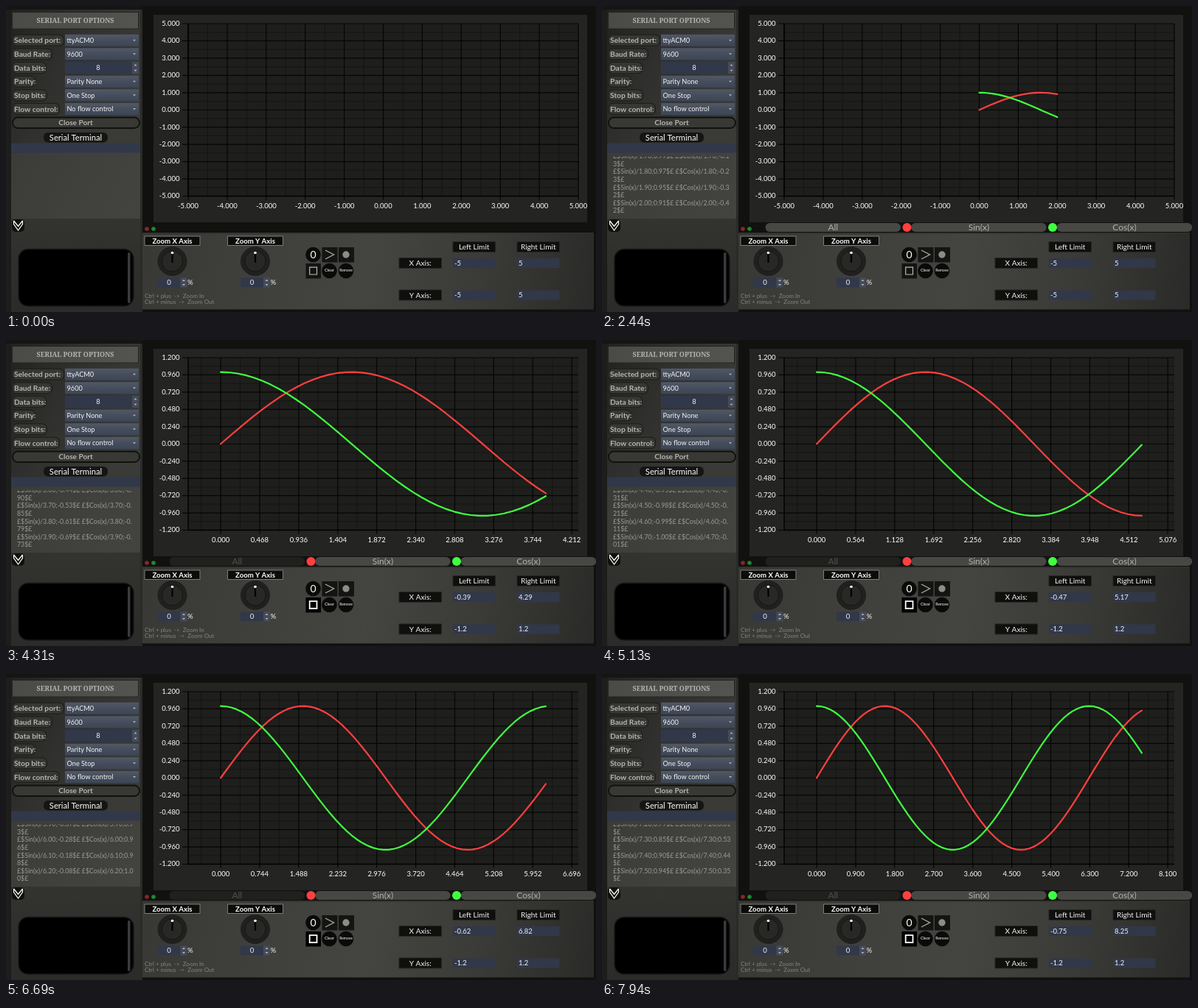
Recreate the animation shown at these times as an HTML page with a canvas. Size 800 by 416 pixels, loop 8 s.

```html
<!DOCTYPE html>
<html lang="en">
<head>
<meta charset="utf-8">
<title>Serial plotter</title>
<style>
html, body { margin: 0; width: 100%; height: 100%; overflow: hidden; background: #11110f; }
canvas { display: block; width: 800px; height: 416px; }
</style>
</head>
<body>
<canvas id="stage"></canvas>
<script>
const W = 800, H = 416, LOOP = 8000;
const START = 400, SAMPLE = 100, DIM_ALL = 3500, AUTO_FIT = 4060;
const PLOT = { x: 247, y: 24, w: 529, h: 234.5 };
const RED = '#ff4040', GREEN = '#40ff40', FIELD = '#31384a';
const canvas = document.getElementById('stage');
const ctx = canvas.getContext('2d');
const dpr = window.devicePixelRatio || 1;
canvas.width = W * dpr;
canvas.height = H * dpr;

function text(s, x, y, size, color = '#f4f4f4', align = 'left', weight = 400, family = 'Lato, sans-serif') {
  ctx.font = `${weight} ${size}px ${family}`;
  ctx.fillStyle = color;
  ctx.textAlign = align;
  ctx.textBaseline = 'alphabetic';
  ctx.fillText(s, x, y + size * 0.35);
}

function box(x, y, w, h, fill, r = 0, stroke, lw = 1) {
  ctx.beginPath();
  ctx.roundRect(x, y, w, h, r);
  if (fill) { ctx.fillStyle = fill; ctx.fill(); }
  if (stroke) { ctx.strokeStyle = stroke; ctx.lineWidth = lw; ctx.stroke(); }
}

function disc(x, y, r, fill, stroke, lw = 1) {
  box(x - r, y - r, 2 * r, 2 * r, fill, r, stroke, lw);
}

function path(points, color, lw) {
  ctx.beginPath();
  points.forEach(([x, y]) => ctx.lineTo(x, y));
  ctx.strokeStyle = color;
  ctx.lineWidth = lw;
  ctx.stroke();
}

function arrow(x, y, dir, color = '#b4b8c0') {
  ctx.beginPath();
  ctx.moveTo(x - 2, y - dir);
  ctx.lineTo(x + 2, y - dir);
  ctx.lineTo(x, y + dir * 1.2);
  ctx.fillStyle = color;
  ctx.fill();
}

function gradient(x0, y0, x1, y1, ...colors) {
  const g = ctx.createLinearGradient(x0, y0, x1, y1);
  colors.forEach((c, i) => g.addColorStop(i / (colors.length - 1), c));
  return g;
}

function spinArrows(x, y, h) {
  box(x, y, 9, h, '#454b58');
  arrow(x + 4.5, y + h * 0.27, -1);
  arrow(x + 4.5, y + h * 0.73, 1);
}

function portPanel() {
  box(0, 0, 185, H, gradient(0, 0, 185, 90, '#20201e', '#30302e', '#3a3a37'));
  box(0, 289, 185, 127, gradient(0, 289, 0, 416, '#333330', '#2b2b29'));
  box(0, 0, 7, H, '#1d1d1b');
  box(182, 0, 3, H, '#2a2a28');
  box(0, 0, 185, 5, '#151513');
  box(8.5, 8.5, 171, 22.5, gradient(8, 0, 180, 0, '#4a4a47', '#535350'), 0, '#242422');
  text('SERIAL PORT OPTIONS', 94, 19.7, 9, '#b4b4b0', 'center', 700, '"Noto Serif", serif');

  const rows = [
    ['Selected port:', 'ttyACM0', 70], ['Baud Rate:', '9600', 54], ['Data bits:', '8', 46],
    ['Parity:', 'Parity None', 31], ['Stop bits:', 'One Stop', 47], ['Flow control:', 'No flow control', 64]
  ];
  rows.forEach(([label, value, w], i) => {
    const y = 46.7 + i * 18.65;
    box(8.5, y - 7.5, w, 15, '#363633', 6, '#1e1e1c', 1.2);
    text(label, 11, y, 10.2, '#b4b4b0', 'left', 700);
    if (i === 2) {
      box(80, y - 8, 100, 16, FIELD);
      text(value, 125, y, 9.4, '#f4f4f4', 'center');
      spinArrows(171, y - 8, 16);
    } else {
      box(80, y - 8, 100, 16, gradient(0, y - 8, 0, y + 8, '#515866', '#454d5c', '#3d4657'));
      text(value, 82.5, y, 9.2);
      arrow(174, y, 1);
    }
  });
  box(9, 151.5, 172, 14.5, '#383835', 7, '#10100e', 1.8);
  text('Close Port', 94.5, 158.5, 10.1, '#b4b4b0', 'center', 700);
  box(51, 172, 87, 13.5, '#151513', 6);
  text('Serial Terminal', 94.5, 178.7, 11.2, '#ffffff', 'center');
  box(7, 186.5, 175, 13, FIELD);
  box(7, 199.5, 175, 89.5, gradient(7, 200, 182, 289, '#3b3b38', '#40403d', '#434340'));

  box(8, 290, 17, 17, '#10100e', 5);
  path([[10.5, 292], [16.5, 299.5], [22.5, 292]], '#ffffff', 1.3);
  path([[10.5, 292], [10.5, 296.5], [16.5, 305], [22.5, 296.5], [22.5, 292]], '#ffffff', 1.2);

  box(17, 330.5, 156, 77.5, '#000000', 13, '#191917', 1.5);
  box(165, 335, 3.5, 69, '#3a3a3e', 1.7);
}

function knob(x, label) {
  box(x - 37.5, 313, 75, 12.5, '#0c0c0b', 0, '#7c7c79');
  text(label, x, 319.2, 9.6, '#ffffff', 'center', 700);
  disc(x, 347, 19.5, '#20201e', '#1a1a18');
  ctx.setLineDash([1, 2]);
  disc(x, 347, 19.5, null, '#30302d', 1);
  ctx.setLineDash([]);
  disc(x, 347, 14, '#282826', '#161614');
  path([[x, 336], [x, 349]], '#000000', 2.2);
  disc(x, 335.5, 1.8, '#ffffff');
  box(x - 20, 369.5, 31, 13, FIELD);
  text('0', x - 4.5, 376, 9.6, '#f4f4f4', 'center');
  spinArrows(x + 11, 369.5, 13);
  text('%', x + 20.5, 376, 9.6);
}

function controls(auto) {
  box(185, 308.5, 612, 104, gradient(185, 308, 797, 412, '#383835', '#3f3f3c', '#444441', '#3a3a37', '#2a2a28'));
  box(185, 308, 612, 1.5, '#30302d');
  knob(225.5, 'Zoom X Axis');
  knob(338, 'Zoom Y Axis');
  text('Ctrl + plus  ->  Zoom In', 188, 394, 8, '#84847f');
  text('Ctrl + minus  ->  Zoom Out', 188, 401.7, 8, '#84847f');

  disc(416.5, 338, 10.3, '#0a0a09');
  text('0', 416.5, 337.7, 14, '#ffffff', 'center');
  box(428.5, 328, 21, 20.5, '#141412');
  path([[433, 332], [444.5, 338], [433, 344]], '#a8a8a3', 1.4);
  box(451, 328, 21, 20.5, '#141412');
  disc(461, 338, 4.7, '#8c8c88');
  box(406.5, 350, 20.5, 20.5, auto ? '#000000' : '#141412');
  box(411.7, 355.2, 9.8, 9.8, null, 0, auto ? '#ffffff' : '#b8b8b3', auto ? 1.8 : 1.2);
  disc(438.5, 360, 10.3, '#0a0a09');
  text('Clear', 438.5, 359.5, 5.7, '#ffffff', 'center');
  disc(461, 360, 10.3, '#0a0a09');
  text('Remove', 461, 359.5, 5, '#ffffff', 'center');
}

function caption(s, x, y) {
  box(x, y - 7, 57.5, 14, '#0f0f0e', 0, '#252523');
  text(s, x + 28.7, y, 10.1, '#f4f4f4', 'center');
}

function limits(view) {
  caption('Left Limit', 606, 327.5);
  caption('Right Limit', 693, 327.5);
  caption('X Axis:', 533, 349.5);
  caption('Y Axis:', 533, 393);
  [[view.x0, 606, 349.5], [view.x1, 693, 349.5], [view.y0, 606, 393], [view.y1, 693, 393]].forEach(([v, x, y]) => {
    box(x, y - 6.5, 57.5, 13, FIELD);
    text(String(+v.toFixed(2)), x + 2, y, 9.5);
  });
}

function chart(view, count) {
  const { x, y, w, h } = PLOT;
  const px = v => x + (v - view.x0) / (view.x1 - view.x0) * w;
  const py = v => y + (view.y1 - v) / (view.y1 - view.y0) * h;
  const stepX = (view.x1 - view.x0) / 10, stepY = (view.y1 - view.y0) / 10;

  box(200, 12, 588, 282, '#242422');
  box(x, y, w, h, '#1e1e1c');
  for (let i = -11; i <= 21; i++) {
    const gx = px(i * stepX / 2), gy = py(i * stepY / 2);
    if (i % 2 && gx > x && gx < x + w) path([[gx, y], [gx, y + h]], '#151513', 1);
    if (i % 2 && gy > y && gy < y + h) path([[x, gy], [x + w, gy]], '#151513', 1);
  }
  for (let i = -5; i <= 10; i++) {
    const gx = px(i * stepX), gy = py(i * stepY);
    if (gx > x - 1 && gx < x + w + 1) {
      path([[gx, y], [gx, y + h + 5]], '#050505', 1.2);
      text((i * stepX).toFixed(3), gx, 271.5, 9.5, '#ffffff', 'center');
    }
    if (i <= 5) {
      path([[x - 8, gy], [x + w, gy]], '#050505', 1.2);
      text((i * stepY).toFixed(3), 235.5, gy - 0.5, 9.5, '#ffffff', 'right');
    }
  }
  path([[x, y], [x, y + h], [x + w, y + h]], '#000000', 1.4);

  ctx.lineJoin = ctx.lineCap = 'round';
  for (const [fn, color] of [[Math.sin, RED], [Math.cos, GREEN]]) {
    const points = [];
    for (let i = 0; i <= count; i++) points.push([px(i / 10), py(fn(i / 10))]);
    if (count > 0) path(points, color, 2.2);
  }
  ctx.lineJoin = 'miter';
  ctx.lineCap = 'butt';
}

function tabs(count, dim) {
  disc(191, 303, 2.8, '#8c2525');
  disc(200, 303, 2.8, '#1f8a2c');
  if (count < 0) return;
  ['All', 'Sin(x)', 'Cos(x)'].forEach((name, i) => {
    const off = dim && i === 0, x = 221.5 + i * 197.6;
    box(x, 295, 183.5, 12, off ? '#20201e' : '#474744', 6);
    text(name, x + 91.8, 301, 12, off ? '#50504d' : '#b0b0ac', 'center');
  });
  disc(413.5, 301, 6, RED);
  disc(611, 301, 6, GREEN);
}

function terminal(count) {
  const lines = [];
  for (let i = Math.max(0, count - 3); i <= count; i++) {
    const x = i / 10, at = x.toFixed(2);
    const s = `£$Sin(x)/${at};${Math.sin(x).toFixed(2)}$£ £$Cos(x)/${at};${Math.cos(x).toFixed(2)}$£`;
    lines.push(s.slice(0, 39), s.slice(39));
  }
  ctx.save();
  ctx.beginPath();
  ctx.rect(7, 204.5, 175, 81);
  ctx.clip();
  const top = lines.length < 8 ? 210 : 204.3;
  lines.forEach((s, i) => text(s, 15, top + i * 10.53, 8.8, '#9a9a96'));
  ctx.restore();
}

function draw(t) {
  const count = Math.floor((t - START) / SAMPLE);
  const auto = t >= AUTO_FIT, last = count / 10;
  const view = auto
    ? { x0: -0.1 * last, x1: 1.1 * last, y0: -1.2, y1: 1.2 }
    : { x0: -5, x1: 5, y0: -5, y1: 5 };
  ctx.setTransform(dpr, 0, 0, dpr, 0, 0);
  box(0, 0, W, H, '#11110f');
  portPanel();
  terminal(count);
  chart(view, count);
  tabs(count, t >= DIM_ALL);
  controls(auto);
  limits(view);
}

const begin = performance.now();
function tick() {
  draw((performance.now() - begin) % LOOP);
  requestAnimationFrame(tick);
}
tick();
</script>
</body>
</html>
```
